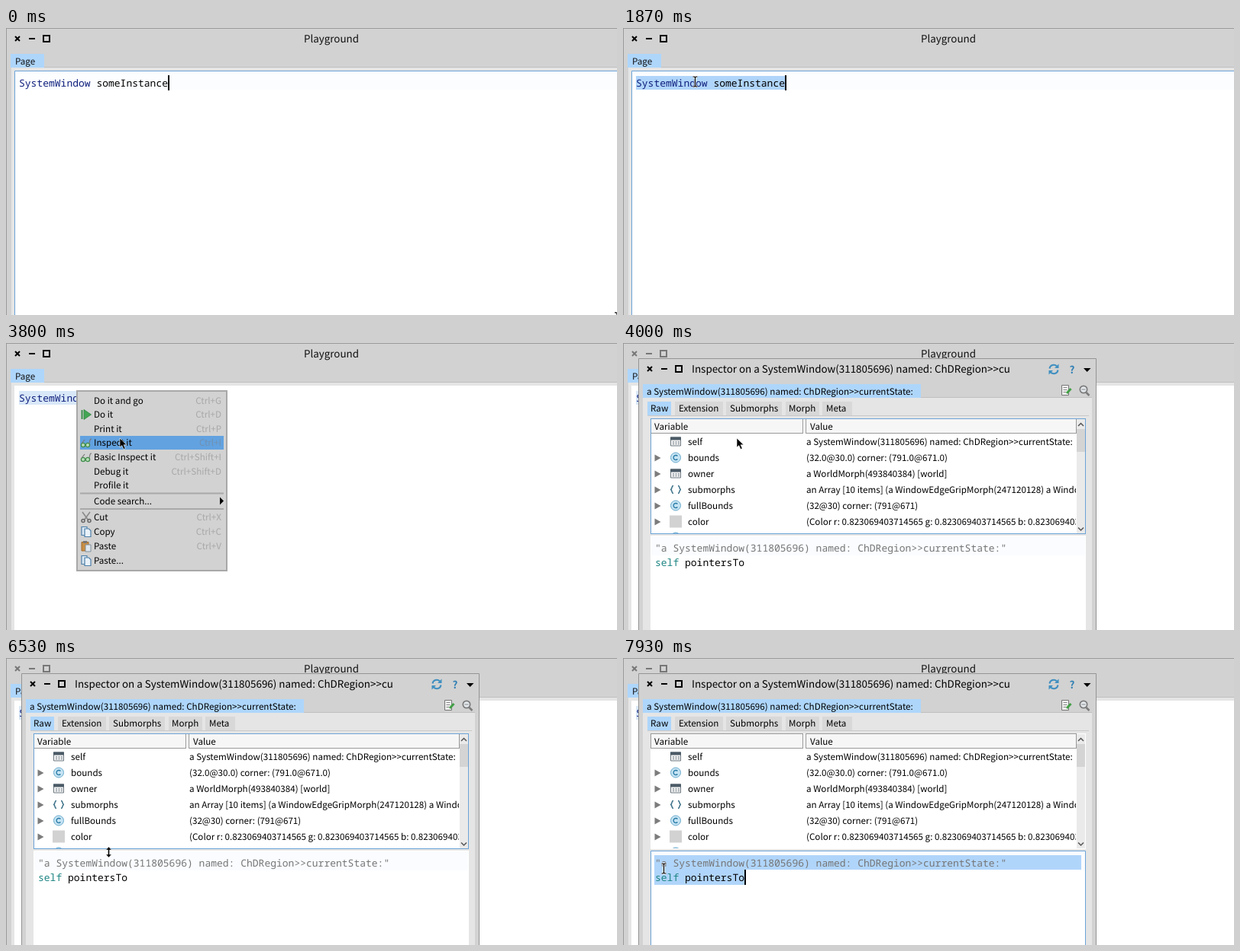
An HTML page for the animation above (8 s loop, 800x377 px).

```html
<!DOCTYPE html>
<html lang="en">
<head>
<meta charset="utf-8">
<title>Playground</title>
<style>
html, body { margin: 0; width: 100%; height: 100%; overflow: hidden; background: #d2d2d2; }
svg { display: block; width: 800px; height: 377px; }
text { font: 11.63px 'Noto Sans CJK JP', 'Noto Sans CJK SC', 'Noto Sans CJK', 'Open Sans', sans-serif; text-rendering: geometricPrecision; white-space: pre; }
.title { font-size: 13.42px; }
.code { font: 13px 'Noto Sans Mono', 'DejaVu Sans Mono', monospace; }
</style>
</head>
<body>
<svg id="stage" viewBox="0 0 800 377" xmlns="http://www.w3.org/2000/svg"></svg>
<script>
const LOOP = 8000, STEP = 1000 / 15, CHAR = 7.8;
const FACE = '#d2d2d2', TAB = '#aed6fb', FOCUS = '#6ba3d6', SELECT = '#b0d5fa', PALE = '#d9e8f8';

// Markup helpers
const box = (x, y, w, h, fill, more = '') => `<rect x="${x}" y="${y}" width="${w}" height="${h}" fill="${fill}" ${more}/>`;
const frame = (x, y, w, h, color) => box(x + .5, y + .5, w - 1, h - 1, 'none', `stroke="${color}"`);
const path = (d, fill = 'none', stroke = 'none', width = 1) => `<path d="${d}" fill="${fill}" stroke="${stroke}" stroke-width="${width}"/>`;
const esc = s => s.replace(/&/g, '&amp;').replace(/</g, '&lt;').replace(/>/g, '&gt;');
const label = (x, y, s, fill = '#000', more = '') => `<text x="${x}" y="${y}" fill="${fill}" ${more}>${esc(s)}</text>`;
const code = (x, y, s, fill) => label(x, y, s, fill, 'class="code"');
const group = (id, body, more = '') => `<g id="${id}" ${more}>${body}</g>`;
const at = (x, y, body) => `<g transform="translate(${x} ${y})">${body}</g>`;

const buttons = (x, y) => at(x, y,
  path('M-3 -3L3 3M3 -3L-3 3', 'none', 'currentColor', 2) +
  path('M15 0H23', 'none', 'currentColor', 2) +
  path('M34 -4H42V4H34Z', 'none', 'currentColor', 2));

// Icons, each centred on 0,0
const icon = {
  play: path('M-5.5 -6V6', 'none', '#3c8f4c', 2) + path('M-3 -6.5L6.5 0L-3 6.5Z', '#43a653', '#2f8740', .8),
  glasses: '<g fill="#b9dcb9" stroke="#3f8d4a" stroke-width="1.3"><circle cx="-4" cy="3" r="2.6"/><circle cx="2" cy="3" r="2.6"/></g>' +
    path('M-6 1L-2 -4M4 1C5 -4 5 -5 7 -5', 'none', '#777', 1.2),
  cut: path('M-5 -7L3 4M5 -7L-3 4', 'none', '#8a8a8a', 1.6) +
    '<g fill="none" stroke="#666" stroke-width="1.5"><circle cx="-4" cy="4.6" r="2"/><circle cx="4" cy="4.6" r="2"/></g>',
  copy: path('M-6 -6.5H1V4.5H-6Z', '#dce9f4', '#4d7fa8', 1.2) + path('M-2 -4H3.5L6 -1.5V6.5H-2Z', '#e9f2f9', '#4d7fa8', 1.2),
  paste: path('M-6 -5.5H3V6H-6Z', '#c98f45', '#a06a2c') + path('M-4 -7H1V-4H-4Z', '#777') + path('M-1 -2H6V7H-1Z', '#dfe8f0', '#7f8d99'),
  window: path('M-6.5 -5.5H6.5V5.5H-6.5Z', '#f4f4f4', '#6d7880') + box(-7, -6, 14, 4, '#4a5a66') +
    path('M-4 0.5H5M-4 3H5', 'none', '#8b969e', 1.4).replace('/>', ' stroke-dasharray="2 1.5"/>'),
  type: '<circle r="6.5" fill="#c6e4f3" stroke="#67a9cc"/>' + path('M2.4 -2A3 3 0 1 0 2.4 2', 'none', '#2b7ca8', 1.4),
  array: path('M-3 -5C-6 -5 -4 0 -7 0C-4 0 -6 5 -3 5M3 -5C6 -5 4 0 7 0C4 0 6 5 3 5', 'none', '#3c7188', 1.4),
  swatch: box(-8, -8, 16, 16, FACE)
};

// Playground window
const playground =
  box(0, 0, 800, 377, FACE) + path('M0 .5H800M.5 0V377', 'none', '#9a9a9a') +
  group('mainButtons', buttons(15, 14)) +
  label(426, 19, 'Playground', '#111', 'class="title" text-anchor="middle"') +
  box(7, 52, 793, 325, '#e5e5e5') + path('M50 51.5H800', 'none', '#bfbfbf') +
  box(6, 34, 44, 18, TAB) + label(12, 48, 'Page', '#111') +
  box(11, 56, 789, 321, '#fff') +
  group('mainFocus', box(12, 57, 788, 24, '#fbfdff') + path('M11.5 377V56.5H800', 'none', FOCUS)) +
  box(17, 63, 0, 18, SELECT, 'id="mainSel"') +
  code(17, 77, 'SystemWindow', '#0f1f7d') + code(17 + 13 * CHAR, 77, 'someInstance') +
  box(212, 62, 2, 20, '#000', 'id="mainCaret"');

// Context menu
const items = [
  [75, 'Do it and go', 'Ctrl+G'], [93.5, 'Do it', 'Ctrl+D', 'play'], [112, 'Print it', 'Ctrl+P'],
  [130.5, 'Inspect it', 'Ctrl+I', 'glasses'], [149.5, 'Basic Inspect it', 'Ctrl+Shift+I', 'glasses'],
  [168, 'Debug it', 'Ctrl+Shift+D'], [186.5, 'Profile it', ''], [207.5, 'Code search...', ''],
  [228.5, 'Cut', 'Ctrl+X', 'cut'], [247.5, 'Copy', 'Ctrl+C', 'copy'],
  [266.5, 'Paste', 'Ctrl+V', 'paste'], [285.5, 'Paste...', '', 'copy']
];
const menu =
  box(93, 63, 196, 236, FACE, 'stroke="#a8a8a8" stroke-width="2"') +
  box(97, 0, 188, 18, '#62a2e0', 'id="menuHover"') +
  path('M97 197.5H285M97 218H285', 'none', '#a9a9a9', 2) + path('M280 202.5L285 207.5L280 212.5Z', '#000') +
  items.map(([y, name, keys, pic]) =>
    label(115, y + 4.5, name) + label(282, y + 4.5, keys, 'rgba(128,128,128,.5)', 'text-anchor="end"') +
    (pic ? at(105, y + .5, icon[pic]) : '')).join('');

// Inspector window
const subject = 'a SystemWindow(311805696) named: ChDRegion>>currentState:';
const shade = '0.823069403714565';
const rows = [
  ['self', subject, 'window'], ['bounds', '(32.0@30.0) corner: (791.0@671.0)', 'type'],
  ['owner', 'a WorldMorph(493840384) [world]', 'window'],
  ['submorphs', 'an Array [10 items] (a WindowEdgeGripMorph(247120128) a WindowEdgeGripMorph', 'array'],
  ['fullBounds', '(32@30) corner: (791@671)', 'type'],
  ['color', `(Color r: ${shade} g: ${shade} b: ${shade} alpha: 1.0)`, 'swatch'],
  ['extension', 'a MorphExtension (429851040) [other: (name: Column) (Color 0.8', 'type']
];
const rowMarkup = ([name, value, pic], i) => {
  const y = 129.5 + 21 * i;
  return (i ? path(`M41.5 ${y - 4}L49.5 ${y + .5}L41.5 ${y + 5}Z`, '#7c7c7c') : '') +
    at(69, y, icon[pic]) + label(85, y + 4.5, name) + label(240, y + 4.5, value);
};
const tabs = [['Raw', 36, 32, 31], ['Extension', 73, 68, 63], ['Submorphs', 140, 135, 73], ['Morph', 217, 213, 44], ['Meta', 266, 261, 39]];
const inspector =
  box(20, 20, 600, 357, FACE) + path('M20.5 377V20.5H619.5V377', 'none', '#949494') +
  buttons(35, 34) +
  label(90, 39, 'Inspector on a SystemWindow(311805696) named: ChDRegion>>cu', '#000', 'class="title" clip-path="url(#titleClip)"') +
  at(564, 34.5, path('M-5.5 -1A5.5 5.5 0 0 1 4 -4M5.5 1A5.5 5.5 0 0 1 -4 4', 'none', '#3f8fc0', 2) +
    path('M6.5 -7V-1.5H1ZM-6.5 7V1.5H-1Z', '#3f8fc0')) +
  label(588, 39.5, '?', '#2f7fb4', 'class="title" font-weight="bold" style="font-weight:bold" text-anchor="middle"') +
  path('M603 33H612.5L607.7 38Z', '#000') +
  box(26, 72, 588, 305, '#e5e5e5') + path('M390 71.5H614', 'none', '#bfbfbf') +
  box(26, 54, 364, 18, TAB) + label(31, 67.5, subject) +
  at(580, 62, path('M-5.5 -6.5H3.5V6.5H-5.5Z', '#f1f1f1', '#767676') +
    path('M-3.5 -3.5H1.5M-3.5 -.5H1.5M-3.5 2.5H0', 'none', '#888') + path('M1 4L6.5 -2', 'none', '#43a047', 3)) +
  at(603, 61, '<circle r="4.7" fill="#e3e8ec" stroke="#7b7b7b" stroke-width="1.7"/>' +
    path('M3.5 4L7.5 8', 'none', '#7b7b7b', 2.5) + path('M-2.5 0H2.5', 'none', '#888')) +
  tabs.map(([name, x, left, w], i) => box(left, 77, w, 18, i ? '#d8d8d8' : TAB) + label(x, 90, name)).join('') +
  path('M32 95.5H610', 'none', '#c9c9c9') +
  box(36, 99, 570, 152, '#fff') +
  box(41, 0, 552, 21, '#efefef', 'id="rowHover"') +
  `<g clip-path="url(#listClip)">${rows.map(rowMarkup).join('')}</g>` +
  box(36.5, 99.5, 199, 19, '#f6f6f6', 'stroke="#9a9a9a"') + box(239.5, 99.5, 354, 19, '#f6f6f6', 'stroke="#9a9a9a"') +
  label(41, 114, 'Variable') + label(245, 114, 'Value') +
  box(594, 100, 11, 150, '#eaeaea') + box(594, 113, 11, 30, '#d4d4d4') +
  path('M596 109L599.5 105.5L603 109M596 242.5L599.5 246L603 242.5', 'none', '#555', 1.5) +
  group('listFocus', frame(36, 99, 570, 152, FOCUS)) +
  box(36, 253, 570, 124, '#fff') + box(37, 254, 568, 25, '#fafcff') +
  box(41, 259, 0, 19, SELECT, 'id="selTop"') + box(41, 278, 0, 20, SELECT, 'id="selLow"') +
  code(42, 274, `"${subject}"`, '#757575') +
  code(42, 293, 'self', '#1d8583') + code(42 + 5 * CHAR, 293, 'pointersTo') +
  group('paneFocus', path('M36.5 377V253.5H605.5V377', 'none', FOCUS) + box(159, 278, 2, 20, '#000'));

// Pointers, hot spot on 0,0
const beam = 'M-3 -6H-1L0 -5L1 -6H3M0 -5V6M-3 7H-1L0 6L1 7H3';
const pointers =
  group('beam', path(beam, 'none', '#fff', 2.6) + path(beam, 'none', '#000', 1.2)) +
  group('arrow', path('M0 0V12L2.8 9.6L5 14.5L7.2 13.5L5 8.8H9Z', '#000', '#fff', .6)) +
  group('resize', path('M0 -7L3.6 -3H1V3H3.6L0 7L-3.6 3H-1V-3H-3.6Z', '#000', '#fff', .4));

const stage = document.getElementById('stage');
stage.innerHTML =
  '<defs><clipPath id="titleClip"><rect x="88" y="20" width="420" height="30"/></clipPath>' +
  '<clipPath id="listClip"><rect x="37" y="119" width="556" height="131"/></clipPath></defs>' +
  playground + group('menu', menu) + group('inspector', inspector) + pointers;
const el = {};
stage.querySelectorAll('[id]').forEach(n => el[n.id] = n);
const show = (id, on) => el[id].setAttribute('display', on ? 'inline' : 'none');
const set = (id, name, value) => el[id].setAttribute(name, value);

// Pointer track: time, x, y
const track = [
  [0, 800.5, 380], [400, 420, 195], [667, 216, 69], [733, 229, 78], [867, 229, 78], [1333, 11.5, 45],
  [1467, 11.5, 45], [1733, 101, 70], [1867, 94.5, 70], [2200, 94.5, 70], [2400, 115, 88],
  [2600, 139, 117], [2800, 139, 117], [3067, 145, 119], [3400, 145, 119], [3533, 149, 125],
  [4467, 149, 125], [5067, 136, 187], [5333, 134, 212], [5467, 128, 217], [5600, 128, 217],
  [5733, 123, 214], [6267, 123, 214], [6533, 134.5, 255], [6867, 140, 284], [7000, 140, 284],
  [7267, 165, 289], [7333, 165, 289], [7867, 47, 275], [7933, 53.5, 276], [8000, 53.5, 276]
];
function pointerAt(t) {
  const i = Math.max(1, track.findIndex(k => k[0] >= t));
  const [t0, x0, y0] = track[i - 1], [t1, x1, y1] = track[i];
  const p = (t - t0) / (t1 - t0);
  return [x0 + (x1 - x0) * p, y0 + (y1 - y0) * p];
}
const column = (x, left, last) => Math.max(0, Math.min(last, Math.round((x - left) / CHAR)));

function draw(ms) {
  // the screen refreshes fifteen times a second
  const t = Math.floor((ms % LOOP + 3.4) / STEP) * STEP + .5;
  const [x, y] = pointerAt(t);
  const focused = t < 2066, menuOpen = !focused && t < 3866, opened = t > 4000;

  // first selection, dragged leftwards from the end
  const from = t < 867 ? 25 : t < 1333 ? column(x, 17, 25) : 0;
  set('mainSel', 'x', 17 + from * CHAR);
  set('mainSel', 'width', (25 - from) * CHAR);
  set('mainSel', 'fill', focused ? SELECT : PALE);
  show('mainFocus', focused);
  show('mainCaret', focused);
  set('mainButtons', 'color', opened ? '#777' : '#000');

  show('menu', menuOpen);
  const item = Math.min(11, Math.floor((y - 66) / 18.6));
  show('menuHover', menuOpen && t > 2260 && x >= 97);
  if (menuOpen && item >= 0) set('menuHover', 'y', items[item][0] - 8.5);

  show('inspector', opened);
  const row = Math.floor((y - 119) / 21);
  show('rowHover', t > 4530 && y < 245);
  if (opened && row >= 0) set('rowHover', 'y', 119 + row * 21);

  // second selection, from the end of line two up to line one
  const editing = t > 7330;
  const upper = editing && (y < 278 || t > 7860);
  const start = t > 7860 ? 0 : column(x, 42, upper ? 59 : 15);
  show('listFocus', !editing);
  show('paneFocus', editing);
  const topX = start ? 42 + start * CHAR : 41;
  set('selTop', 'x', topX);
  set('selTop', 'width', upper ? 600 - topX : 0);
  const lowX = upper ? 41 : 42 + start * CHAR;
  set('selLow', 'x', lowX);
  set('selLow', 'width', editing ? Math.max(0, 160 - lowX) : 0);

  const shape = focused || (t > 6000 && y > 258) ? 'beam' : t > 6000 && y > 249 ? 'resize' : 'arrow';
  for (const id of ['beam', 'arrow', 'resize']) show(id, id === shape);
  set(shape, 'transform', `translate(${x.toFixed(1)} ${y.toFixed(1)})`);
}

const begin = performance.now();
function tick() {
  draw(performance.now() - begin);
  requestAnimationFrame(tick);
}
draw(0);
requestAnimationFrame(tick);
</script>
</body>
</html>
```
